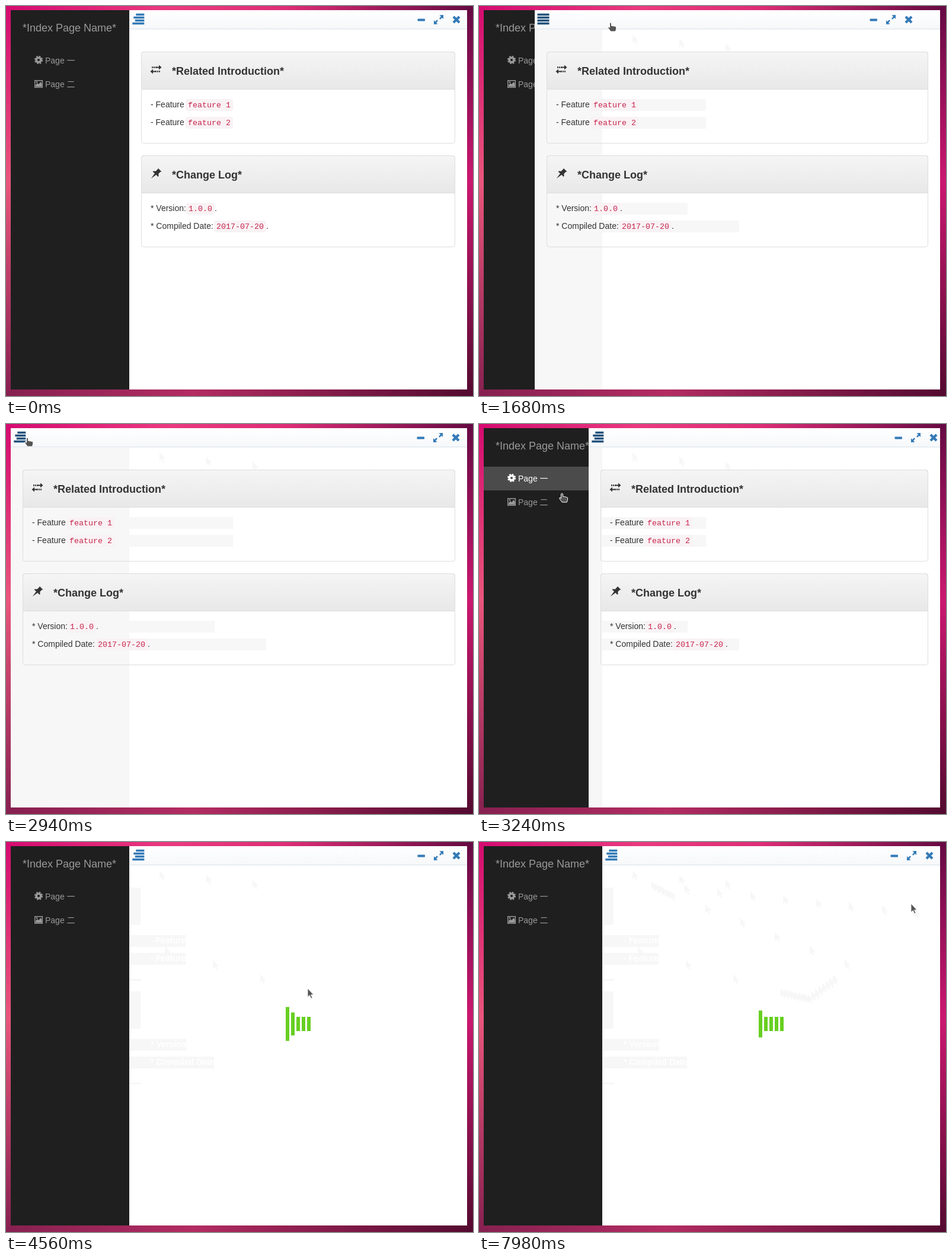
Recreate the animation shown at these times as an HTML page. Size 788 by 658 pixels, loop 8 s.

```html
<!DOCTYPE html>
<html lang="en">
<head>
<meta charset="utf-8">
<title>Sidebar demo</title>
<style>
html, body { margin: 0; width: 100%; height: 100%; overflow: hidden; background: #a01858; }
svg { display: block; }
text { font: 14px "Liberation Sans", Arial, sans-serif; fill: #333; white-space: pre; }
.title { font-size: 18px; font-weight: bold; }
.code { font: 13.33px "Liberation Mono", "Courier New", monospace; fill: #c7254e; }
.brand { font-size: 18px; }
.cjk { font: 300 14px "Noto Sans CJK SC", "Noto Sans CJK", sans-serif; }
.link, .link text { fill: #999; color: #999; }
.link.on, .link.on text { fill: #fff; color: #fff; }
.link .row { fill: none; }
.link.on .row { fill: #4b4b4b; }
.ghost { fill: #f7f7f7; }
.ghost text { fill: #fff; font-weight: bold; }
</style>
</head>
<body>
<svg id="stage" width="788" height="658" viewBox="0 0 788 658">
  <defs>
    <linearGradient id="top"><stop stop-color="#d50b70"/><stop offset=".35" stop-color="#ea3a80"/><stop offset=".6" stop-color="#dd2d76"/><stop offset="1" stop-color="#650a42"/></linearGradient>
    <linearGradient id="left" x2="0" y2="1"><stop stop-color="#d50b70"/><stop offset=".45" stop-color="#e9567c"/><stop offset="1" stop-color="#862050"/></linearGradient>
    <linearGradient id="right" x2="0" y2="1"><stop stop-color="#650a42"/><stop offset=".45" stop-color="#cb1870"/><stop offset="1" stop-color="#540a30"/></linearGradient>
    <linearGradient id="bottom"><stop stop-color="#862050"/><stop offset=".4" stop-color="#b32c62"/><stop offset="1" stop-color="#540a30"/></linearGradient>
    <linearGradient id="head" x2="0" y2="1"><stop stop-color="#f5f5f5"/><stop offset="1" stop-color="#e8e8e8"/></linearGradient>
    <linearGradient id="bar" x2="0" y2="1"><stop stop-color="#fff"/><stop offset="1" stop-color="#f6f8fa"/></linearGradient>
    <clipPath id="window"><path d="M8 7h770v640H8z"/></clipPath>
  </defs>
  <path d="M0 0h788v8H0z" fill="url(#top)"/>
  <path d="M0 646h788v12H0z" fill="url(#bottom)"/>
  <path d="M0 0h8v658H0z" fill="url(#left)"/>
  <path d="M778 0h10v658h-10z" fill="url(#right)"/>
  <g clip-path="url(#window)">
    <path d="M8 7h770v640H8z" fill="#1f1f1f"/>
    <g class="link" id="brand"><text class="brand" x="28" y="43">*Index Page Name*</text></g>
    <g class="link" id="page1">
      <path class="row" d="M8 72h200v40H8z"/>
      <circle cx="55" cy="91" r="3.8" fill="none" stroke="currentColor" stroke-width="3.4"/>
      <circle cx="55" cy="91" r="5.9" fill="none" stroke="currentColor" stroke-width="2.4" stroke-dasharray="2.6 2.034"/>
      <text x="66" y="97">Page <tspan class="cjk" x="102.5">一</tspan></text>
    </g>
    <g class="link" id="page2">
      <path class="row" d="M8 112h200v40H8z"/>
      <path d="M48.7 125.7h12.6v11.6H48.7z" fill="none" stroke="currentColor" stroke-width="1.4"/>
      <path d="M50 136v-3l3-3 2 2 3.500-4 2 3v5z"/><circle cx="52" cy="128.500" r="1.3"/>
      <text x="66" y="137">Page <tspan class="cjk" x="102.5">二</tspan></text>
    </g>
    <path id="paper" fill="#fff"/>
    <path id="strip" class="ghost"/>
    <g id="bands" class="ghost"></g>
    <g id="stains" class="ghost"></g>
    <path id="trail" class="ghost"/>
    <g id="panels"></g>
    <g id="header">
      <path d="M0 7h780v31H0z" fill="url(#bar)"/>
      <path d="M0 38.500h780" stroke="#e2e8ed"/>
      <path d="M0 39.500h780" stroke="#f2f5f7"/>
      <path id="toggle"/>
    </g>
    <g id="tools" fill="#337ab7">
      <rect x="694.500" y="21.500" width="12.500" height="4" rx="1"/>
      <path d="M738 15v7l-2.200-2.200-3 3-1.800-1.800 3-3-2.500-2.500zM722 31v-7l2.200 2.200 3-3 1.800 1.800-3 3 2.500 2.500z"/>
      <path d="M755 18l10 10M765 18l-10 10" stroke="#337ab7" stroke-width="4.200"/>
    </g>
    <g id="loader" fill="#67cf22"></g>
  </g>
  <g id="cursor" fill="#555" stroke="#fff">
    <path id="arrow" stroke-width=".8"/>
    <path id="hand" d="M-1.500 1q1.500-2 3 0v4.500q1.500-1 2.800.4 1.500-.8 2.600.6 1.700-.6 2.600.9v4l-1.300 3.600h-8l-4.200-5.800q-.8-2.400 1-2.200l1.500 1.500z"/>
  </g>
</svg>
<script>
const $ = id => document.getElementById(id);
const LOOP = 8000, STEP = 60;
const COLLAPSE = 1515, EXPAND = 2940, SLIDE = 500, SELECT = 4080, CLEAR = 4260;
const OPEN = 208, SHUT = 8;

// rests and turns of the pointer: time, x, y
const POINTER = [
  [0, 810, 100], [480, 180, 40], [840, 150, 34], [1440, 222, 28], [1740, 222, 28],
  [2280, 62, 28], [2760, 36, 23], [EXPAND, 36, 23], [3240, 140, 117],
  [SELECT, 108, 128], [CLEAR, 108, 128], [4560, 509, 247], [5040, 555, 256],
  [5580, 555, 256], [6000, 597, 224], [6060, 617, 198], [6360, 323, 82],
  [6660, 291, 66], [7140, 735, 112], [7680, 729, 104], [LOOP, 729, 104]
];
const ARROW = 'v14.500l3.300-3 2.500 5.500 2.200-1-2.400-5.200h4.400z';
$('arrow').setAttribute('d', 'M0 0' + ARROW);

const PANELS = [
  { y: 77, title: '*Related Introduction*',
    icon: '<path d="M254 102.500h4v-3l4.500 4-4.500 4v-3h-4zM252 109.500h-4v-3l-4.500 4 4.500 4v-3h4z"/><path d="M246 103.500h8M252 110.500h8" stroke="#333" stroke-width="2.500" stroke-dasharray="2 1"/>',
    lines: [['- Feature', 303, 'feature 1', ''], ['- Feature', 303, 'feature 2', '']] },
  { y: 252, title: '*Change Log*',
    icon: '<path d="M257 274l5.500 5.500-2.200.5-3 3 .3 4-1.200 1-3-3.200-8.600 6.200 6.200-8.600-3.400-2.800 1-1.200 4 .3 3-3z"/>',
    lines: [['* Version:', 304, '1.0.0', '.'], ['* Compiled Date:', 351, '2017-07-20', '.']] }
];
const codeWidth = code => code.length * 8 + 8;
const eachLine = make => PANELS.map(({ y, lines }) =>
  lines.map((line, i) => make(y + 94 + 30 * i, ...line)).join('')).join('');
const box = (x, y, w, h, rest = '') => `<rect x="${x}" y="${y}" width="${w}" height="${h}" ${rest}/>`;

$('panels').innerHTML = PANELS.map(({ y, title, icon }) =>
  `<path class="head" fill="url(#head)" stroke="#ddd"/>
   <rect class="frame" x="228.500" y="${y + .5}" height="154" rx="4" fill="none" stroke="#ddd"/>
   <g fill="#333">${icon}</g><text class="title" x="280" y="${y + 39}">${title}</text>`).join('') +
  eachLine((base, label, x, code, end) =>
    `<text x="244" y="${base}">${label}</text>
     ${box(x, base - 14, codeWidth(code), 20, 'rx="4" fill="#f9f2f4"')}
     <text class="code" x="${x + 4}" y="${base}">${code}</text>
     <text x="${x + codeWidth(code)}" y="${base}">${end}</text>`);

// faint remains of what stood on the page before
$('bands').innerHTML = eachLine((base, label, x, code) => box(OPEN, base - 14, x + codeWidth(code) - OPEN, 20));
$('stains').innerHTML = PANELS.map(({ y }) => box(OPEN, y, 19, 63) + box(OPEN, y + 154, 20, 3)).join('') +
  eachLine((base, label, x) => box(OPEN, base - 14, x - OPEN, 20) + `<text x="244" y="${base}">${label}</text>`);

$('loader').innerHTML = '<rect width="6"/>'.repeat(5);
const bars = [...$('loader').children];
const heads = document.querySelectorAll('.head');
const frames = document.querySelectorAll('.frame');

function bezier(x1, y1, x2, y2) {
  const curve = (a, b, s) => 3 * (1 - s) ** 2 * s * a + 3 * (1 - s) * s * s * b + s ** 3;
  return x => {
    if (x <= 0) return 0;
    if (x >= 1) return 1;
    let lo = 0, hi = 1;
    for (let i = 0; i < 24; i++) {
      const mid = (lo + hi) / 2;
      if (curve(x1, x2, mid) < x) lo = mid; else hi = mid;
    }
    return curve(y1, y2, lo);
  };
}
const ease = bezier(.25, .1, .25, 1);
const easeWidth = bezier(.38, 0, .285, 1);

const between = (t, a, b) => t >= a && t < b;
const show = (id, on) => $(id).setAttribute('display', on ? 'inline' : 'none');
const shift = (id, x, y = 0) => $(id).setAttribute('transform', `translate(${x} ${y})`);

function pointerAt(t) {
  const i = Math.max(1, POINTER.findIndex(key => key[0] > t));
  const [t0, x0, y0] = POINTER[i - 1], [t1, x1, y1] = POINTER[i];
  const f = Math.max(0, (t - t0) / (t1 - t0));
  return [Math.round(x0 + (x1 - x0) * f), Math.round(y0 + (y1 - y0) * f)];
}

function trailPath(t) {
  let d = '';
  for (let s = 300; s < t; s += STEP) {
    const [x, y] = pointerAt(s);
    if (x > 240 && y > 40) d += `M${x} ${y}${ARROW}`;
  }
  return d;
}

function togglePath(justified) {
  const insets = justified ? [0, 0, 0, 0] : [6, 2, 4.5, 0];
  const x = justified ? 4.5 : 5.3;
  return insets.map((inset, i) => `M${x + inset} ${12.7 + i * 5}h${20 - inset}v3.500h${inset - 20}z`).join('');
}

// what lies under the pointer
function hoverAt(t, left) {
  const [x, y] = pointerAt(t);
  if (between(t, COLLAPSE, 1800) || (y < 40 && between(x, left, left + 34))) return 'toggle';
  if (x >= left) return '';
  if (between(y, 18, 56)) return x < 188 ? 'brand' : '';
  return between(y, 72, 112) ? 'page1' : between(y, 112, 152) ? 'page2' : '';
}

// stretch during the first fifth of 1.2 s, shrink during the second
function barHeight(phase) {
  const p = ((phase % 1.2) + 1.2) % 1.2 / .24;
  return 24 + 36 * (p < 1 ? ease(p) : 1 - ease(p - 1));
}

function draw(t) {
  const opening = t >= EXPAND;
  const f = (t - (opening ? EXPAND : COLLAPSE)) / SLIDE;
  const hidden = opening ? 1 - ease(f) : ease(f);
  const wide = opening ? 1 - easeWidth(f) : easeWidth(f);
  const left = Math.round(OPEN - (OPEN - SHUT) * hidden);
  const loading = t >= CLEAR;

  $('paper').setAttribute('d', `M${left} 7H778V647H${left}z`);
  $('strip').setAttribute('d', `M${left} 40H${OPEN}V647H${left}z`);
  show('bands', between(t, COLLAPSE, CLEAR));
  show('stains', loading);
  show('panels', !loading);
  show('loader', loading);
  $('trail').setAttribute('d', trailPath(t));

  shift('panels', left - OPEN);
  const width = 529 + OPEN - left;
  frames.forEach(el => el.setAttribute('width', width));
  heads.forEach((el, i) => el.setAttribute('d',
    `M228.500 ${PANELS[i].y + 63.5}v-59q0-4 4-4h${width - 8}q4 0 4 4v59z`));

  shift('header', left);
  shift('tools', Math.round(200 * (wide - hidden) - hidden));

  // styles follow the pointer one step late
  const hover = hoverAt(t - STEP, left);
  for (const id of ['brand', 'page1', 'page2']) $(id).classList.toggle('on', hover === id);
  const focused = between(t, COLLAPSE, SELECT);
  $('toggle').setAttribute('d', togglePath(between(t, COLLAPSE, EXPAND)));
  $('toggle').setAttribute('fill', focused || hover === 'toggle' ? '#23527c' : '#337ab7');

  bars.forEach((bar, i) => {
    const h = barHeight(.16 + (t - 4560) * .00103 - i * .1);
    bar.setAttribute('x', 472 + 9 * i);
    bar.setAttribute('y', 307 - h / 2);
    bar.setAttribute('height', h);
  });

  shift('cursor', ...pointerAt(t));
  show('hand', hover);
  show('arrow', !hover);
}

function tick() {
  const t = performance.now() % LOOP;
  draw(Math.floor(t / STEP) * STEP);
  requestAnimationFrame(tick);
}
tick();
</script>
</body>
</html>
```
